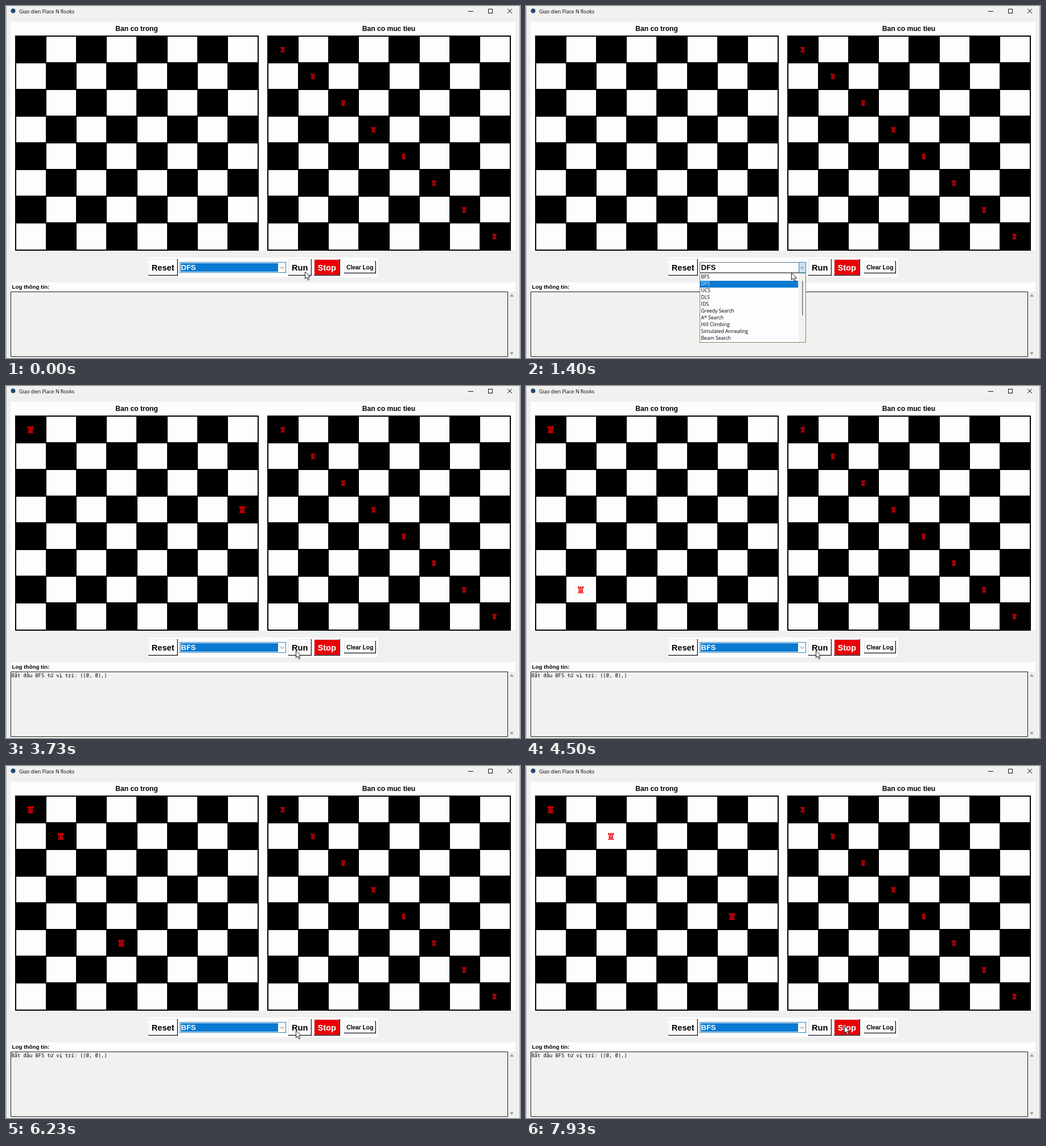
An HTML page with a canvas for the animation above (8 s loop, 903 by 620 pixels).

```html
<!DOCTYPE html>
<html lang="vi">
<head>
<meta charset="utf-8">
<title>Giao dien Place N Rooks</title>
<style>
html, body { margin: 0; width: 100%; height: 100%; overflow: hidden; background: #f0f0f0; }
canvas { display: block; }
</style>
</head>
<body>
<canvas id="stage" width="903" height="620"></canvas>
<script>
const ctx = document.getElementById('stage').getContext('2d');
const LOOP = 8000, OPEN = 1067, CLOSE = 1830, HOVER_BFS = 1600;
const SEARCH_START = 2622, SEARCH_STEP = 52, LAST_STEP = 102;
const SANS = '"Liberation Sans", Arial, sans-serif';
const UI = '8.65px "Open Sans", "Noto Sans", sans-serif';
const MONO = '8.75px "Noto Sans Mono", "DejaVu Sans Mono", monospace';
const RED = '#f00008', BLUE = '#0a7ad1', WHITE = '#fdfdfd', DARK = '#16161e';
const METHODS = ['BFS', 'DFS', 'UCS', 'DLS', 'IDS', 'Greedy Search', 'A* Search',
  'Hill Climbing', 'Simulated Annealing', 'Beam Search'];

// time, x, y of the pointer tip
const POINTER = [
  [30, 526, 468], [830, 488, 463], [1000, 481, 462], [1399, 481, 462],
  [1400, 467, 470], [1599, 467, 470], [1600, 464, 481], [1635, 462, 483],
  [1670, 460, 479], [1830, 460, 479], [2130, 507, 464], [2299, 507, 464],
  [2300, 510, 466], [7150, 510, 466], [7400, 560, 458]
];

const ROOK = [
  [-5, -6, 2.4, 2.2], [-1.2, -6, 2.4, 2.2], [2.6, -6, 2.4, 2.2], [-5, -4, 10, 1.5],
  [-3.6, -2, 1.8, 5], [-0.9, -2, 1.8, 5], [1.8, -2, 1.8, 5],
  [-4, 2.6, 8, 1.2], [-5, 4.5, 10, 1.5]
];

function box(x, y, w, h, color) {
  ctx.fillStyle = color;
  ctx.fillRect(x, y, w, h);
}

function frame(x, y, w, h, color) {
  ctx.strokeStyle = color;
  ctx.lineWidth = 1;
  ctx.strokeRect(x + 0.5, y + 0.5, w - 1, h - 1);
}

function text(str, x, y, font, color = '#000', align = 'left') {
  ctx.font = font;
  ctx.fillStyle = color;
  ctx.textAlign = align;
  ctx.fillText(str, x, y);
}

function line(points, color, width = 1) {
  ctx.strokeStyle = color;
  ctx.lineWidth = width;
  ctx.beginPath();
  points.forEach(([x, y]) => ctx.lineTo(x, y));
  ctx.stroke();
}

function shape(points, color) {
  ctx.beginPath();
  points.forEach(([x, y]) => ctx.lineTo(x, y));
  ctx.closePath();
  ctx.fillStyle = color;
  ctx.fill();
}

function rook(left, [row, col], sx, sy) {
  ctx.save();
  ctx.translate(left + 27 + col * 53.15, 77 + row * 47);
  ctx.scale(sx, sy);
  ROOK.forEach(r => box(...r, RED));
  ctx.restore();
}

function board(left, title) {
  text(title, left + 213.5, 44.3, 'bold 12.1px ' + SANS, '#000', 'center');
  box(left, 52, 428, 379, '#000');
  for (let r = 0; r < 8; r++) {
    for (let c = 0; c < 8; c++) {
      if ((r + c) % 2) box(Math.round(left + 2 + c * 53.15), 54 + r * 47, 52, 45 + (r === 7), WHITE);
    }
  }
}

function button(label, x, y, w, h, size, fill = WHITE, color = '#000') {
  box(x, y, w, h, DARK);
  box(x, y, w - 1.5, h - 1.5, '#e4e4e4');
  box(x + 1, y + 1, w - 2.5, h - 2.5, fill);
  text(label, x + w / 2 - 0.3, y + h / 2 + size * 0.36, `bold ${size}px ${SANS}`, color, 'center');
}

function titleBar() {
  box(0, 0, 903, 20, '#f1f1f1');
  ctx.fillStyle = '#24486e';
  ctx.beginPath();
  ctx.arc(12.5, 8.5, 4, 0, Math.PI * 2);
  ctx.fill();
  text('Giao dien Place N Rooks', 23, 12.7, UI);
  line([[812, 9.5], [821, 9.5]], '#111');
  frame(847, 5, 8, 8, '#111');
  line([[881, 5], [889, 13]], '#111');
  line([[889, 5], [881, 13]], '#111');
}

function combo(t, tip) {
  const open = t >= OPEN && t < CLOSE;
  const hot = open || (tip[0] > 479 && tip[0] < 492 && tip[1] > 451 && tip[1] < 470);
  const value = t < CLOSE ? 'DFS' : 'BFS';
  box(305, 451, 187, 19, WHITE);
  frame(305, 451, 187, 19, open ? '#5c6f80' : '#2f83bd');
  if (!open) box(307, 453, 171, 15, BLUE);
  text(value, 307.5, 465.2, 'bold 13px ' + SANS, open ? '#000' : '#fff');
  if (hot) {
    box(479, 451, 13, 19, '#c9e4f6');
    frame(479, 451, 13, 19, '#2f83bd');
  }
  line([[482, 459.5], [485, 462.5], [488, 459.5]], '#555');
  if (open) dropdown(t < HOVER_BFS + 60 ? 1 : 0);
}

function dropdown(picked) {
  box(305, 470, 187, 123, WHITE);
  box(479, 471, 12, 121, '#f1f1f1');
  METHODS.forEach((name, i) => {
    if (i === picked) box(306, 472 + i * 12, 172, 12, BLUE);
    text(name, 307.5, 480.4 + i * 12, UI, i === picked ? '#fff' : '#000');
  });
  box(485, 484, 1.5, 61, '#777');
  frame(305, 470, 187, 123, '#82836c');
}

function logArea(t) {
  box(8, 487, 887, 16, WHITE);
  text('Log thông tin:', 10.5, 498.4, 'bold 9.8px ' + SANS);
  box(8, 503, 874, 115, '#f1f1ef');
  frame(8, 503, 874, 115, '#1c1c1c');
  if (t >= SEARCH_START) text('Bắt đầu BFS từ vị trí: ((0, 0),)', 9.5, 513, MONO);
  shape([[885, 512], [888.5, 507], [892, 512]], '#a0a0a0');
  shape([[885, 609.5], [888.5, 614.5], [892, 609.5]], '#a0a0a0');
}

// Breadth-first order: each state adds one rook below the last, on a free column.
function searchStates(limit) {
  const states = [[[0, 0]]];
  for (let i = 0; states.length <= limit; i++) {
    const base = states[i];
    for (let r = base[base.length - 1][0] + 1; r < 8; r++) {
      for (let c = 0; c < 8; c++) {
        if (base.every(p => p[1] !== c)) states.push([...base, [r, c]]);
      }
    }
  }
  return states;
}
const STATES = searchStates(LAST_STEP);

function pointerAt(t) {
  const next = POINTER.findIndex(k => k[0] > t);
  if (next === 0) return POINTER[0].slice(1);
  if (next < 0) return POINTER[POINTER.length - 1].slice(1);
  const a = POINTER[next - 1], b = POINTER[next];
  const u = (t - a[0]) / (b[0] - a[0]), e = u * u * (3 - 2 * u);
  return [a[1] + (b[1] - a[1]) * e, a[2] + (b[2] - a[2]) * e];
}

function pointer([x, y]) {
  const outline = [[0, 0], [0, 12.5], [2.9, 9.8], [5, 14.8], [7.2, 13.9], [5.1, 9], [9, 9]];
  ctx.save();
  ctx.translate(x - 0.5, y);
  shape(outline, '#fff');
  ctx.strokeStyle = '#15151c';
  ctx.lineWidth = 1;
  ctx.stroke();
  ctx.restore();
}

function draw(t) {
  const tip = pointerAt(t);
  box(0, 0, 903, 620, '#f0f0f0');
  titleBar();
  box(8, 28, 887, 403, WHITE);
  board(16, 'Ban co trong');
  board(459, 'Ban co muc tieu');
  for (let i = 0; i < 8; i++) rook(459, [i, i], 0.68, 0.8);
  if (t >= SEARCH_START) {
    const step = Math.min(LAST_STEP, Math.floor((t - SEARCH_START) / SEARCH_STEP));
    STATES[step].forEach(p => rook(16, p, 1, 1));
  }
  box(249, 443, 404, 35, WHITE);
  button('Reset', 250, 446, 52, 29, 14.6);
  button('Run', 496, 446, 41, 29, 14.6);
  button('Stop', 541, 446, 46, 29, 14.6, '#e90007', '#fff');
  button('Clear Log', 594, 449, 56, 22, 10.3);
  logArea(t);
  combo(t, tip);
  box(0, 0, 1, 620, '#a9adb2');
  box(902, 0, 1, 620, '#a9adb2');
  pointer(tip);
}

const start = performance.now();
function tick() {
  draw((performance.now() - start) % LOOP);
  requestAnimationFrame(tick);
}
tick();
</script>
</body>
</html>
```
